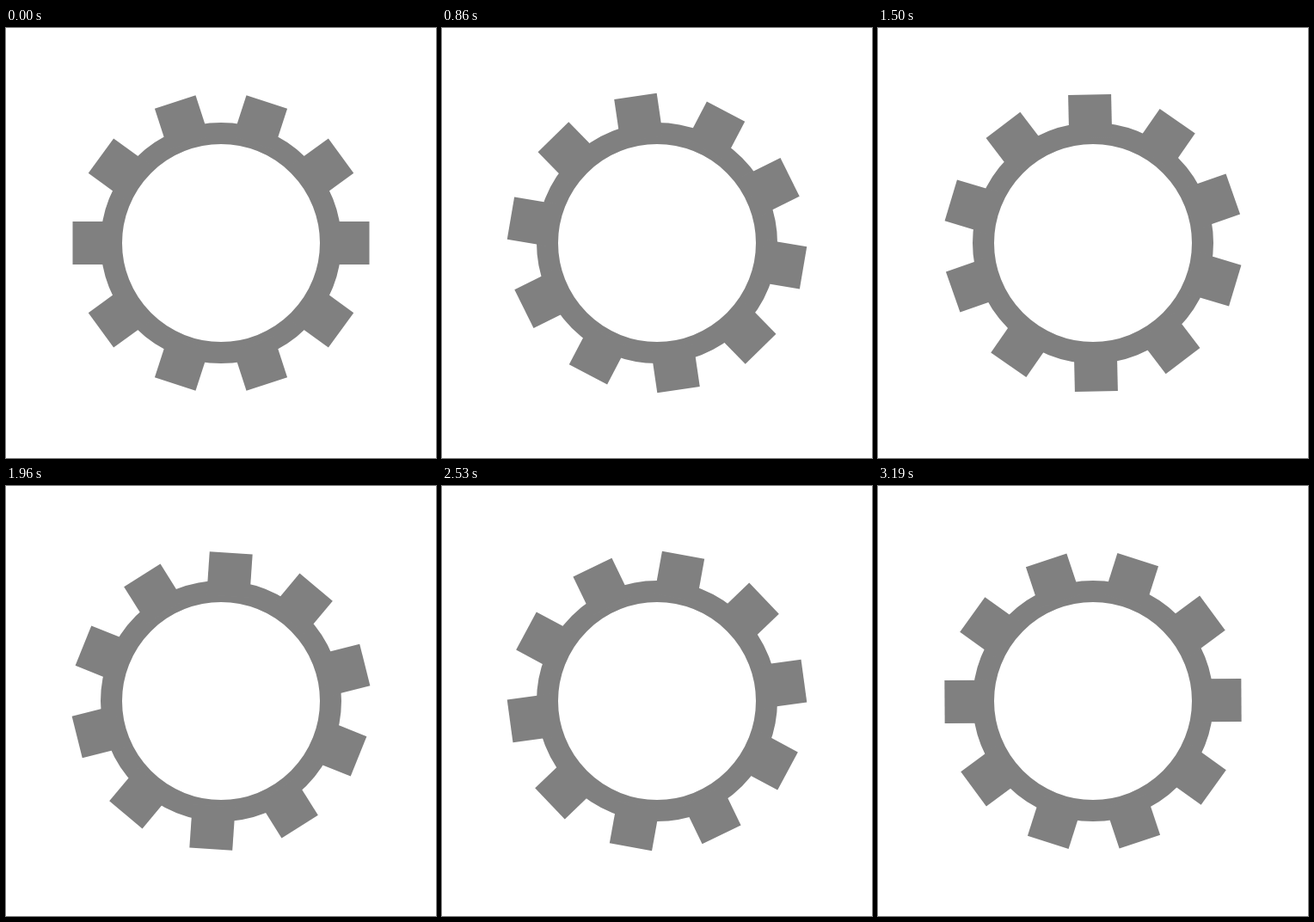
An HTML page with a canvas that plays this animation: 500 px wide and 500 px high, repeating every 3230 ms.

```html
<!DOCTYPE html>
<html lang="en">
<head>
<meta charset="utf-8">
<title>Turning gear</title>
<style>
  html, body { margin: 0; width: 100%; height: 100%; overflow: hidden; background: #fff; }
  canvas { display: block; width: 500px; height: 500px; }
</style>
</head>
<body>
<canvas id="stage" width="500" height="500"></canvas>
<script>
const ctx = document.getElementById("stage").getContext("2d");
const LOOP = 3230;
const STEPS = 97;
const STEP_TICKS = 3.326; // step length in ticks of 10 ms
const TEETH = 10;
const PITCH = 2 * Math.PI / TEETH;
const GREY = "#808080";

// The gear advances in small steps, one tooth pitch per loop.
function angleAt(ms) {
  const tick = Math.floor((ms % LOOP) / 10);
  const step = Math.floor((tick + 0.5) / STEP_TICKS);
  return PITCH * step / STEPS;
}

function drawGear(angle) {
  ctx.fillStyle = "#fff";
  ctx.fillRect(0, 0, 500, 500);

  ctx.save();
  ctx.translate(250, 250);
  ctx.strokeStyle = GREY;
  ctx.lineWidth = 25;
  ctx.beginPath();
  ctx.arc(0, 0, 127.5, 0, 2 * Math.PI);
  ctx.stroke();

  ctx.fillStyle = GREY;
  ctx.rotate(angle);
  for (let i = 0; i < TEETH; i++) {
    ctx.fillRect(122.5, -25, 50, 50);
    ctx.rotate(PITCH);
  }
  ctx.restore();
}

let start = null;
function frame(now) {
  if (start === null) start = now;
  drawGear(angleAt(Math.max(0, now - start)));
  requestAnimationFrame(frame);
}

drawGear(0);
requestAnimationFrame(frame);
</script>
</body>
</html>
```
